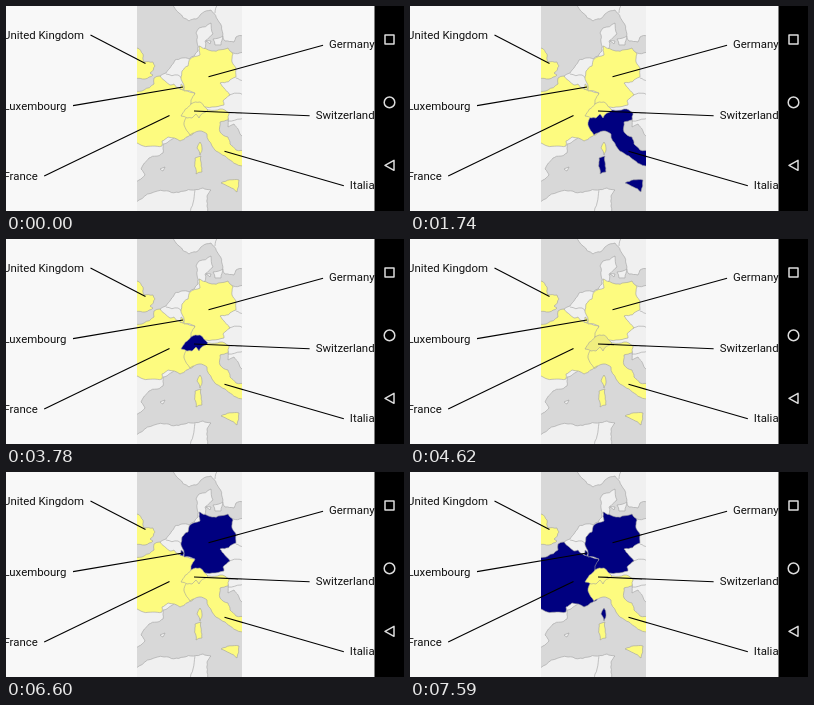
These frames come from a looping animation (398x205 px, 8 s). An HTML page:

```html
<!DOCTYPE html>
<html lang="en">
<head>
<meta charset="utf-8">
<title>Map quiz</title>
<style>
  html, body { margin: 0; width: 100%; height: 100%; overflow: hidden; background: #f8f8f8; }
  svg { display: block; width: 398px; height: 205px; }
  text { font: 11.4px Roboto, Arial, sans-serif; fill: #111; text-anchor: end; }
  #map path { stroke: #a0a0a0; stroke-width: .6; stroke-linejoin: round; }
  #pins { stroke: #000; stroke-width: 1.1; }
  #keys { fill: none; stroke: #dcdcdc; stroke-width: 1.5; stroke-linejoin: round; }
</style>
</head>
<body>
<svg viewBox="0 0 398 205">
  <clipPath id="frame"><rect x="131" width="105" height="205"/></clipPath>
  <rect width="398" height="205" fill="#f8f8f8"/>
  <g id="map" clip-path="url(#frame)"><rect x="131" width="105" height="205" fill="#d8d8d8"/></g>
  <g id="pins"></g>
  <g id="names"></g>
  <rect x="368.5" width="29.5" height="205" fill="#000"/>
  <g id="keys">
    <rect x="379" y="29" width="9" height="9"/>
    <circle cx="383.5" cy="96.4" r="5.3"/>
    <path d="M379 159.3L388 154.3V164.3Z"/>
  </g>
</svg>
<script>
const LOOP = 8000, FADE = 270;
const YELLOW = [253, 251, 127], NAVY = [0, 0, 128];

// Key points of each coast; roughen() adds the small bays. "|" splits islands.
const land = [
  "120,187 133,174 139,169 135,163 143,152 157,147 157,138 185,120 222,112 222,121 228,118 236,130 245,130 245,44 227,47 198,46 199,35 207,28 205,17 193,22 190,27 192,45 183,53 169,54 160,67 154,70 150,100 120,133",
  "166,-3 173,7 183,15 190,13 205,4 213,16 219,35 228,36 230,31 245,30 245,-3",
  "207,33 217,30 215,39 209,39|200,35 205,35 204,38|154,163 159,161 157,165",
  "120,202 133,194 158,185 197,182 205,184 201,190 203,210 120,210"
];

const borders = [
  "160,68 172,69 176,73", "230,72 245,79", "223,89 245,90", "223,107 245,105",
  "222,115 235,113 245,110", "189,184 187,197 183,207", "209,7 212,-2"
];

// Painted in this order, so each one trims the neighbour beneath it.
const quiz = {
  uk: "120,42 131,42 137,48 138,56 147,56 149,60 144,67 147,69 139,73 120,75",
  france: "120,84 138,84 148,78 148,72 154,70 164,79 168,78 174,83 189,87 185,98 190,115 187,128 174,135 162,131 156,135 156,140 120,133" +
    "|194,136 196,142 194,149 191,142",
  germany: "193,40 206,45 222,42 227,48 226,56 230,62 230,71 214,77 224,89 217,95 218,99 206,101 185,98 185,94 189,87 178,85 175,73 176,65 182,60 184,53 194,49",
  luxembourg: "175,78 178,81 177,84 174,83",
  italy: "181,111 187,106 203,104 214,103 223,107 222,114 214,116 214,126 222,131 224,138 230,144 240,145 240,164 230,158 215,148 206,140 201,128 193,125 184,129 178,119" +
    "|215,177 233,174 231,186|189,152 195,150 196,166 190,168",
  switzerland: "175,110 185,98 194,96 202,104 193,112 190,108 186,112 181,112"
};

// Start of the fade to navy and, where there is one, of the fade back.
const fades = {
  italy: [1470, 2460], switzerland: [3500, 4390], luxembourg: [5370],
  germany: [6330], france: [7310]
};

// Name, end of the text, height and tip of the line.
const labels = [
  ["United Kingdom", 78, 29, 139.5, 57.5],
  ["Luxembourg", 60.5, 99.6, 177, 81],
  ["France", 31.7, 170, 163.5, 109.5],
  ["Germany", 368.6, 39.2, 202.5, 70.7],
  ["Switzerland", 368.6, 109.8, 188, 105],
  ["Italia", 368.6, 179.8, 218.5, 145.3]
];

const byId = id => document.getElementById(id);

function add(parent, tag, attrs, text = "") {
  const el = document.createElementNS("http://www.w3.org/2000/svg", tag);
  for (const key in attrs) el.setAttribute(key, attrs[key]);
  el.textContent = text;
  byId(parent).appendChild(el);
  return el;
}

let seed = 7;
function random() {
  seed = seed * 16807 % 2147483647;
  return seed / 2147483647;
}

// Splits an edge at a displaced midpoint until the pieces are short.
function roughen([ax, ay], [bx, by]) {
  const dx = bx - ax, dy = by - ay;
  if (Math.hypot(dx, dy) < 3.5) return [[bx, by]];
  const push = (random() - .5) * .22;
  const mid = [(ax + bx) / 2 - dy * push, (ay + by) / 2 + dx * push];
  return [...roughen([ax, ay], mid), ...roughen(mid, [bx, by])];
}

function trace(part, closed) {
  const keys = part.split(" ").map(pair => pair.split(",").map(Number));
  const ends = closed ? [...keys.slice(1), keys[0]] : keys.slice(1);
  const points = ends.flatMap((end, i) => roughen(keys[i], end));
  const line = points.map(p => "L" + p.map(v => v.toFixed(1))).join("");
  return "M" + keys[0] + line + (closed ? "Z" : "");
}

const shape = (outline, fill, closed = true) => add("map", "path", {
  d: outline.split("|").map(part => trace(part, closed)).join(""), fill
});

const mix = p => `rgb(${YELLOW.map((c, i) => Math.round(c + (NAVY[i] - c) * p))})`;

function ramp(t, from) {
  const p = Math.min(1, Math.max(0, (t - from) / FADE));
  return (1 - Math.cos(Math.PI * p)) / 2;
}

for (const outline of land) shape(outline, "#f0f0f0");
for (const line of borders) shape(line, "none", false);

const areas = {};
for (const name in quiz) areas[name] = shape(quiz[name], mix(0));

for (const [name, x, y, x2, y2] of labels) {
  const onLeft = x < 200;
  const text = add("names", "text", { x, y: y + (onLeft ? 4.3 : 3) }, name);
  const x1 = onLeft ? x + 6.5 : x - text.getComputedTextLength() - 6;
  add("pins", "line", { x1, y1: y, x2, y2 });
}

function draw(t) {
  for (const name in fades) {
    const [on, off = Infinity] = fades[name];
    areas[name].setAttribute("fill", mix(ramp(t, on) - ramp(t, off)));
  }
}

const start = performance.now();
function tick() {
  draw((performance.now() - start) % LOOP);
  requestAnimationFrame(tick);
}
tick();
</script>
</body>
</html>
```
